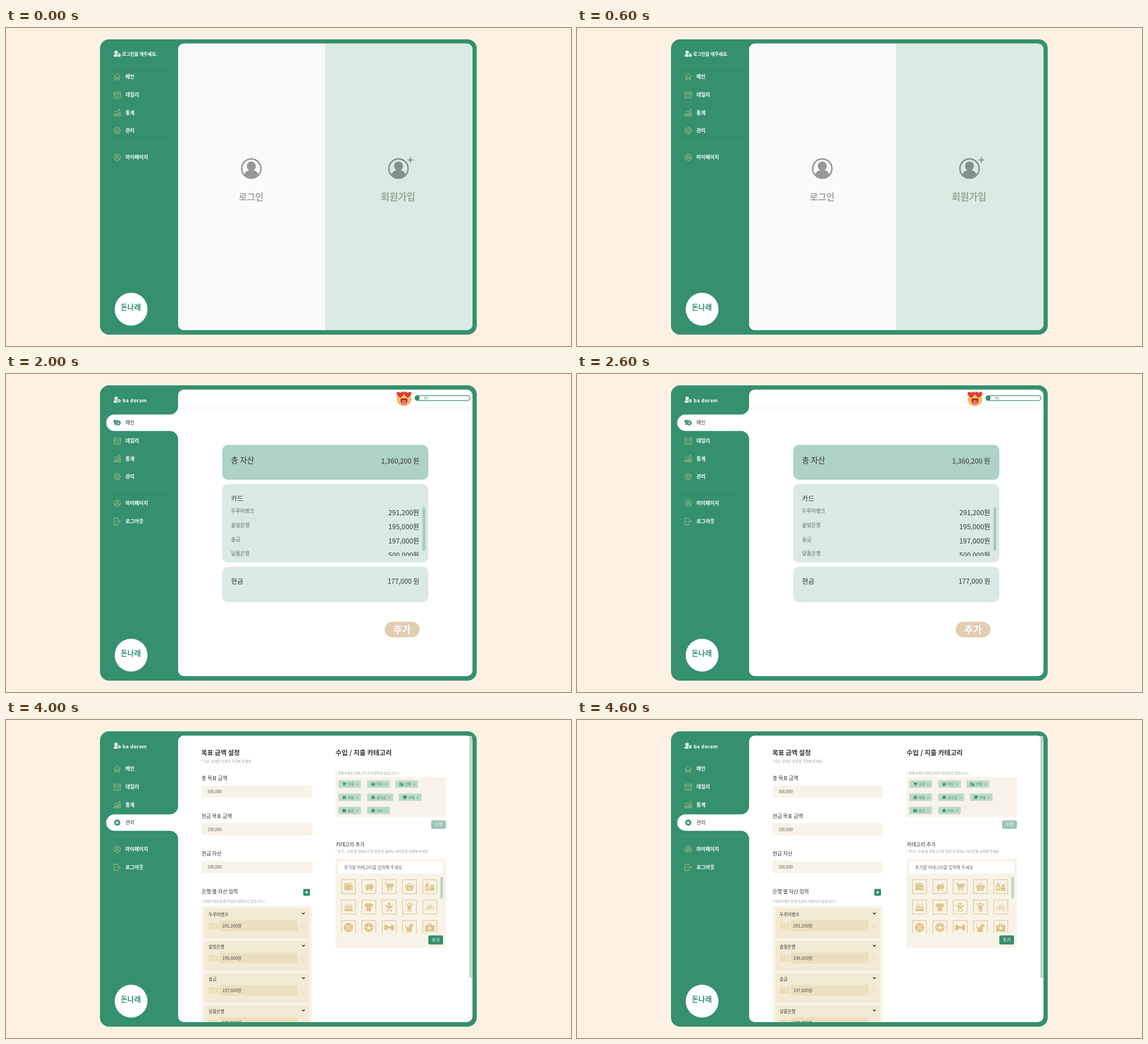
Recreate the animation shown at these times as an HTML page with a canvas. Size 998 px wide and 561 px high, loop 5 s.

```html
<!DOCTYPE html>
<html lang="ko">
<head>
<meta charset="utf-8">
<title>가계부</title>
<style>
html, body { margin: 0; width: 100%; height: 100%; overflow: hidden; background: #fdf1e3; }
canvas { display: block; width: 998px; height: 561px; }
</style>
</head>
<body>
<canvas id="stage"></canvas>
<script>
const W = 998, H = 561, STEP = 1000;
const canvas = document.getElementById('stage');
const ctx = canvas.getContext('2d');
const dpr = window.devicePixelRatio || 1;
canvas.width = W * dpr;
canvas.height = H * dpr;

const GREEN = '#35906d', GOLD = '#dfc58d', CREAM = '#f8f3e8', INK = '#333', PALE = '#b7d9ca';
const FONT = '"Noto Sans CJK KR", "Noto Sans CJK", "Noto Sans", sans-serif';
const USER = 'ba doram', BRAND = '돈나래';
const BANKS = [['두루미뱅크', '291,200원'], ['솔빛은행', '195,000원'], ['솔금', '197,000원'], ['달품은행', '500,000원']];

function gearPath(teeth) {
  let d = '';
  for (let i = 0; i < teeth * 4; i++) {
    const a = (i - 0.5) / (teeth * 4) * Math.PI * 2;
    const r = i % 4 < 2 ? 7.5 : 5.7;
    d += (i ? 'L' : 'M') + (8 + r * Math.cos(a)) + ' ' + (8 + r * Math.sin(a));
  }
  return d + 'zM8 5.3a2.7 2.7 0 010 5.4a2.7 2.7 0 010-5.4z';
}

// Icons live in a 16 x 16 box; a leading ~ means outline.
const ICONS = {
  house: '~M1 8l7-7 7 7M3 7v8h3v-5h4v5h3V7',
  calendar: '~M1 2h14v13H1zM1 6h14M4 10.5h8',
  stats: '~M1 11h3v4H1zM6.5 9h3v6h-3zM12 7h3v8h-3zM1 7l4-3 4 2 5-5M11 1h3v3',
  gear: '~' + gearPath(8),
  user: '~M8 1a7 7 0 010 14a7 7 0 010-14M8 4a2.5 2.5 0 010 5a2.5 2.5 0 010-5M3.5 13q0-4 4.5-4t4.5 4',
  exit: '~M10 4V1H1v14h9v-3M5 8h10M12 5l3 3-3 3',
  money: 'M0 2h9v2H6v3H4v4l2 2H2V9L0 7zM10 3a5.5 5.5 0 010 11a5.5 5.5 0 010-11zM8 6v3h3v1H8v1.5h4V8H9V7h3V6z',
  daily: 'M3 2h13l-1 4H2zM2 7h13v5H0zM0 13h15v2H0z',
  bars: 'M1 11h3v4H1zM6 9h4v6H6zM12 7h3v8h-3zM0 7l5-4 4 2 3-3-1-1h4v4l-1-1-5 4-4-2-4 2z',
  gearFull: gearPath(8),
  wallet: 'M1 2h12v2H3v1h12v9H1zM11 9v2h2V9z',
  pig: 'M1 7h2q1-3 4-3h4l3-2v3l1 2h1v4h-2l-1 4h-2v-3H7v3H4l-1-5z',
  cart: 'M0 1h3l.5 2H16l-2 7H6l.4 1.5H14V13H5L2 2.5H0zM5 14h2v2H5zM11 14h2v2h-2z',
  basket: 'M0 6h3l4-5 1 1-3 4h6L8 2l1-1 4 5h3v2h-1l-2 7H3L1 8H0zM5 9v4h1V9zM7.5 9v4h1V9zM10 9v4h1V9z',
  food: 'M0 5h2V1h3v4h2v10H0zM8 9h8v6H8zM9 8q0-4 3-4t3 4zM2 8v4h3V8z',
  cake: 'M1 10q2 2 4.5 0q2.5 2 5 0q2.5 2 4.5 0v5H1zM1 7h14v2H1zM3 3h1.5v4H3zM7.2 3h1.5v4H7.2zM11.5 3H13v4h-1.5zM3 1h1.5v1H3zM7.2 1h1.5v1H7.2zM11.5 1H13v1h-1.5z',
  shirt: 'M5 1q3 2.5 6 0l5 3-2 4-2-1v8H4V7L2 8 0 4z',
  baby: 'M8 0a2.5 2.5 0 010 5a2.5 2.5 0 010-5zM1 5l2-1 3 2h4l3-2 2 1-4 4v2H5V9zM5 12l2 1-1 1 1 2H5l-2-2zM11 12l-2 1 1 1-1 2h2l2-2z',
  child: 'M8 0a2 2 0 010 4a2 2 0 010-4zM2 1l4 4h4l4-4 1 1-4 5v9H9v-4H7v4H5V7L1 2z',
  bike: '~M3.5 7.5a3 3 0 010 6a3 3 0 010-6M12.5 7.5a3 3 0 010 6a3 3 0 010-6M3.5 10.5l2.5-5h5l1.5 5M6 5.5l2 5 3-5M3.5 10.5H8M5 4h2M10 3h2',
  hoop: 'M8 0a8 8 0 010 16a8 8 0 010-16zM2.8 3.6l9.6 9.6.8-.8L3.6 2.8zM12.4 2.8L8.6 6.6l.8.8 3.8-3.8zM6.6 8.6l-3.8 3.8.8.8 3.8-3.8z',
  soccer: 'M8 0a8 8 0 010 16a8 8 0 010-16zM8 5l3 2.2-1 3.5H6L5 7.2zM8 1l2 1-2 1.5L6 2zM2 6l1.5 1.5-1 2.5-1-1zM14 6l-1.5 1.5 1 2.5 1-1zM4 12h2l.5 2.4zM12 12h-2l-.5 2.4z',
  bone: 'M1 4a2 2 0 013.5-.5L5 6h6l.5-2.5A2 2 0 0115 4a2 2 0 010 4a2 2 0 010 4a2 2 0 01-3.5.5L11 10H5l-.5 2.5A2 2 0 011 12a2 2 0 010-4a2 2 0 010-4z',
  cat: 'M8 1l2 2h2l2-2v6l-2 2v7H3v-5L1 8V3h1v4l2 1 4-1z',
  aid: 'M5 4V1h6v3h5v11H0V4zM6.5 4h3V2.5h-3zM7 6v2H5v2h2v2h2v-2h2V8H9V6z',
  clinic: 'M8 1l8 7h-2v7H2V8H0zM7 7v2H5v2h2v2h2v-2h2V9H9V7z',
  home: 'M8 1l8 7h-2v7h-4v-4H6v4H2V8H0z',
  cup: 'M2 2h11q3 0 3 3t-3 3v2q0 2-2 2H5q-3 0-3-2zM13 4v2q1.5 0 1.5-1t-1.5-1zM0 13h15v2H0z'
};

function box(x0, y0, x1, y1, color, r = 0) {
  ctx.fillStyle = color;
  ctx.beginPath();
  ctx.roundRect(x0, y0, x1 - x0, y1 - y0, r);
  ctx.fill();
}

function disc(x, y, r, color) {
  ctx.fillStyle = color;
  ctx.beginPath();
  ctx.arc(x, y, r, 0, Math.PI * 2);
  ctx.fill();
}

function line(x0, y0, x1, y1, color, w = 1, dash = []) {
  ctx.strokeStyle = color;
  ctx.lineWidth = w;
  ctx.setLineDash(dash);
  ctx.beginPath();
  ctx.moveTo(x0, y0);
  ctx.lineTo(x1, y1);
  ctx.stroke();
  ctx.setLineDash([]);
}

// y is the visual middle of the line
function text(str, x, y, size, color = INK, weight = 400, align = 'left') {
  ctx.font = `${weight} ${size}px ${FONT}`;
  ctx.textAlign = align;
  ctx.fillStyle = color;
  ctx.fillText(str, x, y + size * 0.37);
}
const mid = (s, x, y, size, color, weight) => text(s, x, y, size, color, weight, 'center');
const end = (s, x, y, size, color, weight) => text(s, x, y, size, color, weight, 'right');

function icon(name, x, y, size, color) {
  const d = ICONS[name], k = size / 16;
  ctx.save();
  ctx.translate(x - size / 2, y - size / 2);
  ctx.scale(k, k);
  if (d[0] === '~') {
    ctx.strokeStyle = color;
    ctx.lineWidth = 0.9 / k;
    ctx.stroke(new Path2D(d.slice(1)));
  } else {
    ctx.fillStyle = color;
    ctx.fill(new Path2D(d), 'evenodd');
  }
  ctx.restore();
}

function clipped(x0, y0, x1, y1, draw, r = 0) {
  ctx.save();
  ctx.beginPath();
  ctx.roundRect(x0, y0, x1 - x0, y1 - y0, r);
  ctx.clip();
  draw();
  ctx.restore();
}

function plus(x, y, r, color, w) {
  line(x - r, y, x + r, y, color, w);
  line(x, y - r, x, y + r, color, w);
}

function cross(x, y, r, color, w) {
  line(x - r, y - r, x + r, y + r, color, w);
  line(x - r, y + r, x + r, y - r, color, w);
}

const NAV = [
  ['메인', 86, 'house', 'money'], ['데일리', 118, 'calendar', 'daily'],
  ['통계', 149.5, 'stats', 'bars'], ['관리', 181, 'gear', 'gearFull'],
  ['마이페이지', 228, 'user'], ['로그아웃', 260, 'exit']
];

function tab(y) {
  const r = 14.5, x = 289.5;
  ctx.fillStyle = '#fff';
  ctx.beginPath();
  ctx.moveTo(306, y - 2 * r);
  ctx.lineTo(x + r, y - 2 * r);
  ctx.arc(x, y - 2 * r, r, 0, Math.PI / 2);
  ctx.arc(191.5, y, r, -Math.PI / 2, Math.PI / 2, true);
  ctx.arc(x, y + 2 * r, r, -Math.PI / 2, 0);
  ctx.lineTo(306, y + 2 * r);
  ctx.fill();
}

function frame(active) {
  box(0, 0, W, H, '#fdf1e3');
  box(166, 20, 831.5, 541, GREEN, 16);
  box(304, 27.5, 824, 533, '#fff', 10);
  for (const y of [65, 204]) line(182, y, 293, y, '#459b7a', 1);
  if (active >= 0) tab(NAV[active][1]);

  disc(194.5, 43, 3, '#fff');
  box(190, 46.5, 199, 50.5, '#fff', [3, 3, 1, 1]);
  disc(200, 47.5, 3.8, GREEN);
  if (active < 0) {
    box(197.5, 46.5, 202.5, 50.5, '#fff', 0.8);
    ctx.strokeStyle = '#fff';
    ctx.lineWidth = 1;
    ctx.beginPath();
    ctx.arc(200, 46.5, 1.6, Math.PI, 0);
    ctx.stroke();
    text('로그인을 해주세요.', 205, 46.5, 7.9, '#fff', 700);
  } else {
    icon('gearFull', 200, 47.3, 6.5, '#fff');
    ctx.letterSpacing = '0.4px';
    text(USER, 206, 46.5, 8.5, '#fff', 700);
    ctx.letterSpacing = '0px';
  }

  NAV.forEach(([label, y, ico, full], i) => {
    if (i === 5 && active < 0) return;
    const on = i === active;
    icon(on ? full : ico, 196.5, y, 13, on ? GREEN : '#bdc487');
    text(label, 211, y, 8.7, on ? INK : '#fff', on ? 500 : 700);
  });

  disc(221, 496, 29, '#fff');
  mid(BRAND, 220.5, 492, 12.8, GREEN, 700);
}

function heart(x, y, s) {
  ctx.fillStyle = '#e8363c';
  ctx.beginPath();
  ctx.moveTo(x, y + s);
  ctx.bezierCurveTo(x - 2 * s, y - s * 0.2, x - s, y - 1.6 * s, x, y - 0.5 * s);
  ctx.bezierCurveTo(x + s, y - 1.6 * s, x + 2 * s, y - s * 0.2, x, y + s);
  ctx.fill();
}

function header() {
  line(304, 60, 823, 60, '#ececec');
  const g = ctx.createLinearGradient(0, 30, 0, 57);
  g.addColorStop(0, '#fbd66b');
  g.addColorStop(1, '#f2a95e');
  disc(703, 43.5, 13, g);
  heart(696.5, 36.5, 5.6);
  heart(709.5, 36.5, 5.6);
  box(697, 43, 709, 53, '#a8323c', [2, 2, 6, 6]);
  box(699.5, 46, 706.5, 53, '#ee6d7d', [3, 3, 4, 4]);
  ctx.strokeStyle = GREEN;
  ctx.lineWidth = 1.3;
  ctx.beginPath();
  ctx.roundRect(722.5, 38.2, 97, 8.6, 4.3);
  ctx.stroke();
  box(722.5, 38.2, 730.5, 46.8, GREEN, 4);
  text('8%', 738, 42.5, 5.6, GREEN);
}

function login() {
  frame(-1);
  clipped(304, 27.5, 824, 533, () => {
    box(304, 27, 563.5, 533, '#fafafa');
    box(563.5, 27, 824, 533, '#d9ebe2');
  }, 10);
  const face = (x, color) => {
    ctx.strokeStyle = color;
    ctx.lineWidth = 2.6;
    ctx.beginPath();
    ctx.arc(x, 248, 17, 0, Math.PI * 2);
    ctx.stroke();
    disc(x, 243.5, 8, color);
    ctx.save();
    ctx.beginPath();
    ctx.arc(x, 248, 16.5, 0, Math.PI * 2);
    ctx.clip();
    ctx.beginPath();
    ctx.ellipse(x, 262, 13, 12, 0, 0, Math.PI * 2);
    ctx.fill();
    ctx.restore();
  };
  face(433.3, '#979797');
  face(693.3, '#82908a');
  plus(714.3, 232.8, 5, '#82908a', 2);
  mid('로그인', 433, 298, 16, '#a3a3a3', 900);
  mid('회원가입', 692.5, 298, 16.6, '#96a69d', 900);
}

function field(x0, y0, x1, y1, label) {
  box(x0, y0, x1, y1, '#3b8f6e', 5);
  box(x0 - 0.3, y0 - 0.5, x1 + 0.3, y1 - 1.3, '#fdf9f2', 5);
  text(label, x0 + 9, (y0 + y1) / 2 - 1, label[0] === '2' ? 8.4 : 7.5, '#666');
}

function daily() {
  frame(1);
  header();
  box(818.5, 60, 823.5, 418, PALE, 2);
  [[358, '#deeef8', '오늘의 수입'], [588.5, '#f9eef2', '오늘의 지출']].forEach(([x, c, s]) => {
    box(x, 76, x + 176.5, 126, c, 11);
    mid(s, x + 88, 83, 9.3, INK, 500);
    mid('0원', x + 88, 104, 16, INK, 700);
  });
  text('지출', 333, 164, 10.3, GREEN, 700);
  text('수입', 358, 164, 10.3, '#888');
  field(387, 177.5, 586, 197, '2020.10.24');
  field(537, 201, 736, 220.5, '금액을 입력해주세요.');
  field(449, 226.5, 648, 246.5, '상세내역을 입력해주세요.');
  box(588.5, 178, 736, 196, '#3f9b77', 5);
  mid('분류', 655, 186.5, 7.4, '#fff', 500);
  box(387, 201, 534, 219, '#3f9b77', 5);
  mid('은행', 453.5, 210, 7.4, '#fff', 500);
  box(655, 225.5, 675, 246, '#e2c88f', 3);
  plus(664.5, 236, 3, '#fff', 1.2);
  line(308, 264, 818, 264, '#f3f3f3', 2);

  const rows = [
    ['10.12', '5,000', 'clinic', BANKS[1][0], '내과', 0],
    ['10.10', '20,000', 'cart', '현금', '.', 6],
    ['10.7', '3,000', 'cup', '현금', '모루잔', 0]
  ];
  rows.forEach(([day, sum, ico, bank, note, dx], i) => {
    const y = 292 + i * 80;
    text(day, 331, y, 8.2, INK, 500);
    text('지출 :', 335, y + 19, 8.4, INK, 500);
    text(sum + '원', 356.5, y + 19, 9.2, '#efb9cb', 500);
    text('수입 :', 398 + dx, y + 19, 8.4, INK, 500);
    text('0원', 420 + dx, y + 19, 9.2, '#8cc6e2', 500);
    icon(ico, 365, y + 43.5, 11, GOLD);
    mid(bank, 445.5, y + 44, 6, INK);
    mid(note, 561, y + 44, 6, GREEN);
    mid('- ' + sum + ' 원', 677, y + 44, 6.2, '#eeb5c6');
    cross(746, y + 44, 1.9, GREEN, 1.4);
    line(331, y + 62.5, 792, y + 62.5, '#e6e6e6', 1, [2, 1]);
  });
  clipped(304, 500, 824, 533, () => text('10.2', 331, 532, 8.2, INK, 500));
}

function main() {
  frame(0);
  header();
  box(382, 125, 746, 186.5, '#aed2c3', 10);
  box(382, 194, 746, 332.5, '#d9eae3', 10);
  box(382, 340, 746, 402.5, '#d9eae3', 10);
  text('총 자산', 397.5, 152, 13.7, INK, 500);
  end('1,360,200 원', 730, 154, 12.1);
  text('카드', 397.5, 219.5, 11.6, INK, 500);
  clipped(390, 230, 740, 321, () => BANKS.forEach(([name, sum], i) => {
    text(name, 397.5, 241.5 + i * 25, 8.9, '#666');
    end(sum, 730, 245 + i * 25, 12.1);
  }));
  box(735.5, 235, 740.8, 312, '#a5cdbd', 2.5);
  text('현금', 397.5, 366, 11.8, INK, 500);
  end('177,000 원', 730, 366, 11.8);
  box(669, 437, 730.5, 464.5, '#e2cdb0', 13.7);
  mid('추가', 699.5, 451, 16.8, '#fff', 900);
}

function stats() {
  frame(2);
  header();
  mid('10월', 447, 95, 13, INK, 700);
  mid('2020', 681, 95, 14, INK, 700);

  const cx = 447, cy = 188.5, R = 79.5;
  const slices = [
    [50, '#1aa086', 512, 188.5, '쇼핑', '20,000'], [22, '#48b5a0', 406.5, 239.5, '마트', '8,800'],
    [15, '#74c5b4', 383.5, 169, '카페', '6,000'], [13, '#a2d9ce', 421, 126, '병원', '5,000']
  ];
  let a = -Math.PI / 2;
  slices.forEach(([pct, color, lx, ly, name, sum], i) => {
    const b = a + pct / 50 * Math.PI;
    ctx.beginPath();
    ctx.moveTo(cx, cy);
    ctx.arc(cx, cy, R, a, b);
    ctx.closePath();
    ctx.fillStyle = color;
    ctx.fill();
    ctx.strokeStyle = '#fff';
    ctx.lineWidth = 0.9;
    ctx.stroke();
    a = b;
    mid(pct + '%', lx, ly, 7.3, '#fff', 700);
    const y = 324.5 + i * 18.7;
    disc(354, y - 0.5, 3.1, color);
    text(name, 360.5, y, 6.7, '#888');
    end(sum + ' 원', 538, y, 9.3, '#666', 500);
  });

  const x0 = 597, span = 177.5, top = 112, rowH = 23.45;
  for (let i = 0; i < 5; i++) {
    const x = x0 + span * i / 4;
    line(x, top, x, 256, i ? '#e4e4e4' : '#c4c4c4', 0.8);
    mid(String(i * 50000), x, 262, 6.6, '#555');
  }
  for (let i = 0; i < 7; i++) line(593, top + i * rowH, x0 + span, top + i * rowH, '#e4e4e4', 0.8);
  const months = [
    [1, 14800, '#e6f6f2'], [4, 7000, '#d1f0e8'], [5, 70000, '#a5e2d5'],
    [8, 6600, '#7dd4c3'], [9, 197400, '#4bc9b0'], [10, 25000, '#1ebd9b']
  ];
  months.forEach(([m, v, color], i) => {
    const by = top + (i + 0.5) * rowH, w = v / 200000 * span;
    box(x0, by - 8.5, x0 + w, by + 8.5, color);
    ctx.strokeStyle = 'rgba(60,150,125,.35)';
    ctx.lineWidth = 0.7;
    ctx.strokeRect(x0, by - 8.5, w, 17);
    end(m + ' 월', 592, by, 6.1, '#444');
    const y = 324.5 + i * 18.7;
    disc(588, y - 0.5, 3.1, color);
    text(m + '월', 595, y, 6.8, '#888');
    end(v.toLocaleString('en-US') + ' 원', 772, y, 9.3, '#666', 500);
  });
  const rule = '#e3ebe7';
  line(564, 88, 564, 506, rule, 1, [2, 1]);
  line(341, 308, 552, 308, rule, 1, [2, 1]);
  line(577, 308, 787, 308, rule, 1, [2, 1]);
  line(341, 499.5, 553, 499.5, rule, 1, [2, 1]);
}

function bankCard([name, sum], i) {
  const y = 333 + i * 57;
  box(351, y, 535, y + 52, '#f2ead4', 2);
  text(name, 358, y + 10.5, 7.5);
  ctx.strokeStyle = '#222';
  ctx.lineWidth = 1.3;
  ctx.beginPath();
  ctx.moveTo(523, y + 7);
  ctx.lineTo(525.3, y + 9.3);
  ctx.lineTo(527.6, y + 7);
  ctx.stroke();
  box(358, y + 25, 375, y + 35.5, '#ebdcb6', 2);
  mid('수정', 366.5, y + 30.2, 6.2, '#f8f1df', 500);
  box(377, y + 20.5, 515, y + 39.5, '#ecdfbf', 2);
  text(sum, 382, y + 30, 7.5, '#444');
  ctx.strokeStyle = '#ead9b0';
  ctx.lineWidth = 1;
  ctx.beginPath();
  ctx.arc(525.5, y + 31, 3.4, 0, Math.PI * 2);
  ctx.stroke();
}

function manage() {
  frame(3);
  box(818.5, 28, 823.5, 455, PALE, 2);
  text('목표 금액 설정', 345, 57.5, 11.4, INK, 900);
  text('* 모든 금액은 숫자만 기입해 주세요', 345, 72.5, 6.1, '#999');
  [['총 목표 금액', '500,000'], ['현금 목표 금액', '150,000'], ['현금 자산', '200,000']].forEach(([s, v], i) => {
    const y = 103 + i * 66.5;
    text(s, 345.5, y, 9);
    box(345.5, y + 12.5, 540.5, y + 34, CREAM, 2);
    text(v, 356, y + 23.5, 7, '#555');
  });
  text('은행 별 자산 입력', 345.5, 302.5, 9);
  box(525, 298, 537, 310, GREEN, 2);
  plus(531, 304, 2.7, '#fff', 1.3);
  text('( 현재 4개의 은행 자산이 저장되어 있습니다. )', 345.5, 320, 6.05, '#999');
  clipped(304, 320, 818, 533, () => {
    box(345.5, 328, 540.5, 540, CREAM, 2);
    BANKS.forEach(bankCard);
  }, 8);

  text('수입 / 지출 카테고리', 582, 57.5, 11.8, INK, 900);
  text('( 현재 8개의 카테고리가 저장되어 있습니다. )', 582, 93.5, 6.1, '#999');
  box(582, 101, 777, 171.5, CREAM, 2);
  const chips = [
    [587, 0, '쇼핑', 'cart'], [638, 0, '마트', 'basket'], [688, 0, '선물', 'food'],
    [587, 1, '병원', 'clinic'], [638, 1, '공과금', 'home'], [694, 1, '카페', 'cup'],
    [587, 2, '월급', 'wallet'], [638, 2, '이자', 'home']
  ];
  for (const [x, row, s, ico] of chips) {
    const y = 113 + row * 23.3, w = 28.5 + s.length * 5.8;
    box(x, y - 6.5, x + w, y + 6.5, '#bddac9', 1.5);
    icon(ico, x + 10.5, y, 7.5, GREEN);
    text(s, x + 16.5, y, 6.1, GREEN);
    cross(x + w - 7, y + 0.5, 1.7, '#5da386', 0.7);
  }
  box(751, 177, 777, 192, '#98c7b4', 2.5);
  mid('수정', 764, 184.5, 7.5, '#fff', 500);

  text('카테고리 추가', 582.5, 219.5, 8.9);
  text('* 추가 / 수정 할 카테고리명 입력 후 원하는 아이콘을 선택해 주세요', 582, 232, 6, '#999');
  box(582, 245, 777, 401.5, CREAM, 2);
  box(587, 250, 772, 271, '#fff', 2);
  text('추가할 카테고리를 입력해 주세요', 597, 260.5, 7.6, '#666');
  const grid = 'wallet pig cart basket food cake shirt baby child bike hoop soccer bone cat aid'.split(' ');
  clipped(585, 275, 766, 376, () => grid.forEach((name, i) => {
    const x = 605 + i % 5 * 35.9, y = 294 + Math.floor(i / 5) * 36;
    ctx.strokeStyle = GOLD;
    ctx.lineWidth = 1.1;
    ctx.strokeRect(x - 12.3, y - 12.3, 24.6, 24.6);
    icon(name, x, y, 16.5, GOLD);
  }));
  box(767, 276.5, 772, 315, PALE, 2.5);
  box(746, 380, 772, 396, GREEN, 2.5);
  mid('추가', 759, 388, 7.5, '#fff', 500);
}

const scenes = [login, daily, main, stats, manage];

function tick() {
  const i = Math.floor(performance.now() / STEP) % scenes.length;
  ctx.setTransform(dpr, 0, 0, dpr, 0, 0);
  scenes[i]();
  requestAnimationFrame(tick);
}
tick();
</script>
</body>
</html>
```
